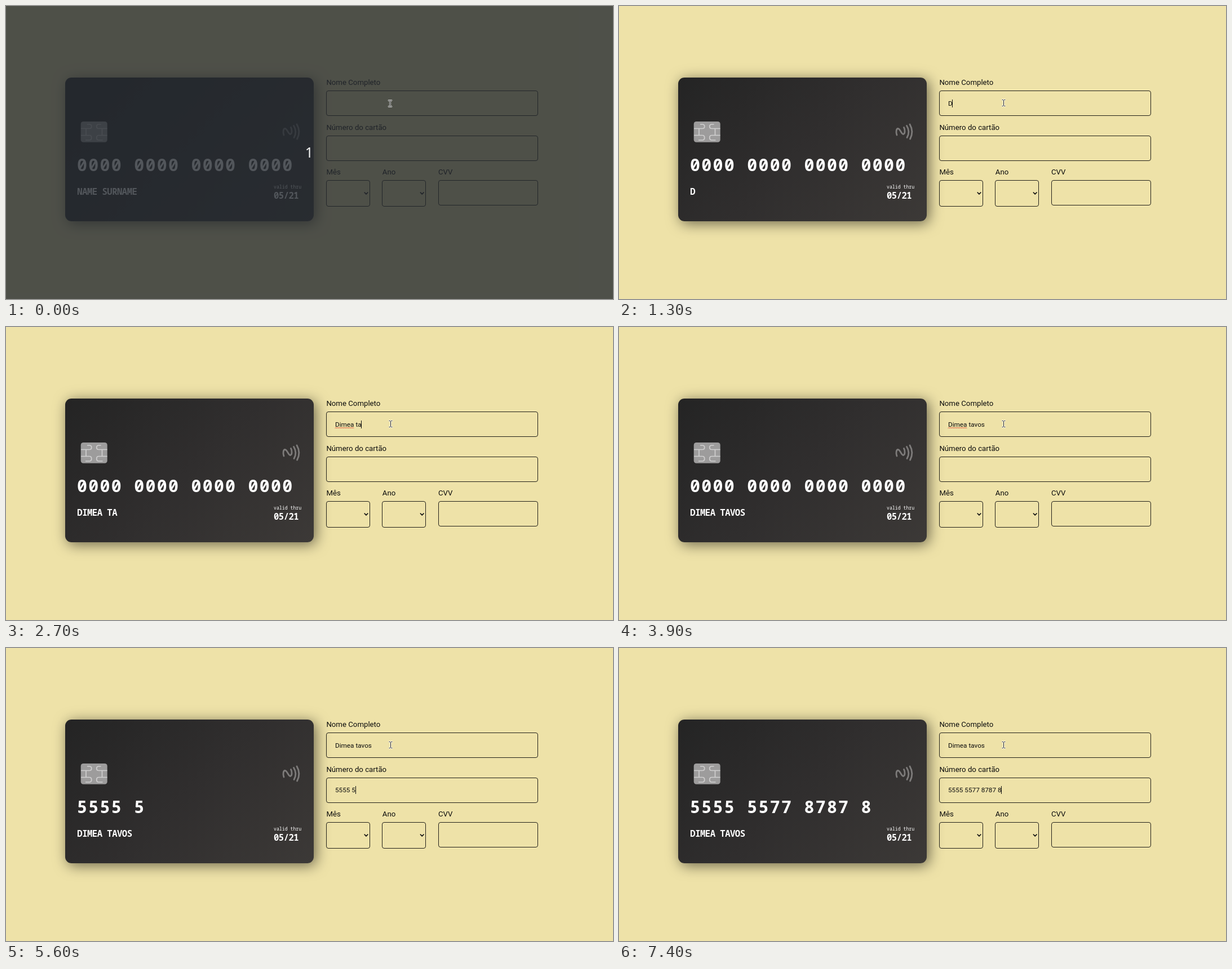
Animation, 1077 px wide and 520 px high, one loop 8000 ms. Source, as an HTML page:

```html
<!DOCTYPE html>
<html lang="pt">
<head>
<meta charset="utf-8">
<title>Card form</title>
<style>
  html, body { margin: 0; width: 100%; height: 100%; overflow: hidden; background: #eee2a8; }
  .card {
    position: absolute; left: 104.5px; top: 127.3px; width: 441.5px; height: 254.5px;
    border-radius: 11px;
    background: linear-gradient(135deg, #242424, #302e2e 50%, #3c3937);
    box-shadow: 4px 4px 24px rgba(0, 0, 0, .55);
  }
  svg { position: absolute; left: 0; top: 0; display: block; }
  text { white-space: pre; }
  .mono { font-family: "Noto Sans Mono", "DejaVu Sans Mono", monospace; fill: #fff; }
  .digits { font-size: 30px; font-weight: 700; letter-spacing: 2.24px; }
  .bold { font-size: 15.6px; font-weight: 700; letter-spacing: -.52px; }
  .small { font-size: 8.2px; }
  .label { font: 13.22px Roboto, sans-serif; fill: #0c0c0c; }
  .value { font: 11.75px Roboto, sans-serif; fill: #0c0c0c; }
  .box { fill: none; stroke: #222019; }
  .line { fill: none; stroke-linecap: round; stroke-linejoin: round; }
  .count { font: 25px "Noto Sans", sans-serif; fill: #f2f2f2; text-anchor: middle; }
</style>
</head>
<body>
<div class="card"></div>
<svg width="1077" height="520" viewBox="0 0 1077 520">
  <defs>
    <path id="contact" d="M133 217.5H148C153 217.5 153 210 148 210H144M142 217.5V229.500M133 229.500H148C153 229.500 153 238 148 238H141"/>
    <path id="beam" d="M-2.500 -5.500H-1L0 -4.500L1 -5.500H2.500M-2.500 5.500H-1L0 4.500L1 5.500H2.500M0 -4.500V4.500"/>
  </defs>

  <rect x="132.700" y="205" width="47" height="36.700" rx="4.500" fill="#9d9c9c"/>
  <g class="line" stroke="#d0cfcf" stroke-width="1.700" style="stroke-linecap:butt">
    <use href="#contact"/>
    <use href="#contact" transform="matrix(-1 0 0 1 312.500 0)"/>
  </g>
  <g class="line" stroke="#7d7b7a" stroke-width="2.800">
    <path d="M493 229C491 224 492 217.500 495 217.500C499 217.500 501 228 504.500 227.500C508 226.500 507.500 219 505.500 215.500"/>
    <path d="M510.500 212.500Q517 223 511 233.500M516 210Q523.500 223 516.500 236"/>
  </g>

  <text id="cardNum" class="mono digits" x="126" y="293"></text>
  <text id="cardName" class="mono bold" x="126.300" y="335.200"></text>
  <text class="mono small" x="475" y="324.300">valid thru</text>
  <text class="mono bold" x="475" y="342">05/21</text>

  <g class="label">
    <text x="568.400" y="139.700">Nome Completo</text>
    <text x="568.400" y="219.500">Número do cartão</text>
    <text x="568.400" y="299">Mês</text>
    <text x="667.800" y="299">Ano</text>
    <text x="767" y="299">CVV</text>
  </g>
  <g class="box">
    <rect x="568.500" y="150.500" width="375" height="44" rx="3.500"/>
    <rect x="568.500" y="230.500" width="375" height="44" rx="3.500"/>
    <rect x="568.500" y="309.500" width="77" height="46" rx="3.500"/>
    <rect x="667.500" y="309.500" width="77" height="46" rx="3.500"/>
    <rect x="767.500" y="309.500" width="176" height="44" rx="3.500"/>
  </g>
  <path class="line" stroke="#111" stroke-width="1.700" style="stroke-linecap:butt"
        d="M635.700 330.500l3.300 3.300l3.300 -3.300M734.900 330.500l3.300 3.300l3.300 -3.300"/>

  <text id="name" class="value" x="584" y="176.900"></text>
  <text id="num" class="value" x="584" y="256.400"></text>
  <path id="wave" class="line" stroke="#e0402c" stroke-width=".9"/>
  <rect id="caret" width="1" height="14" fill="#111"/>

  <g id="shade">
    <rect width="1077" height="520" fill="rgb(36,41,48)" fill-opacity=".79"/>
    <text class="count" x="537.800" y="269">1</text>
  </g>
  <g id="pointer" class="line">
    <use href="#beam" stroke="#fff" stroke-width="2.600" stroke-opacity=".85"/>
    <use href="#beam" stroke="#222" stroke-width="1"/>
  </g>
</svg>
<script>
const LOOP = 8000;
const NAME = 'Dimea tavos';
const NUMBER = '5555 5577 8787 8';

// [time, characters typed]
const nameKeys = [[1300, 1], [1700, 3], [1800, 4], [2000, 5], [2100, 6], [2700, 8], [2900, 9], [3300, 11]];
const numKeys = [[4900, 1], [5200, 3], [5400, 5], [5600, 6], [6300, 8], [6500, 10],
  [6700, 11], [6800, 12], [7200, 15], [7400, 16]];

const el = id => document.getElementById(id);
const typed = (text, keys, t) => text.slice(0, keys.reduce((n, [at, len]) => t >= at ? len : n, 0));
const show = (id, on) => el(id).setAttribute('visibility', on ? 'visible' : 'hidden');
const within = (t, from, to) => t >= from && t < to;

function setText(id, text) {
  if (el(id).textContent !== text) el(id).textContent = text;
}

function wavePath(width) {
  let d = 'M584 179.500';
  for (let x = 1.5, up = true; x <= width; x += 1.5, up = !up) d += `L${584 + x} ${up ? 178.5 : 179.5}`;
  return d;
}

function draw(t) {
  const name = typed(NAME, nameKeys, t);
  const num = typed(NUMBER, numKeys, t);
  setText('name', name);
  setText('num', num);
  setText('cardName', name.toUpperCase() || 'NAME SURNAME');
  setText('cardNum', num || '0000 0000 0000 0000');

  const misspelt = within(t, 2100, 4500);
  show('wave', misspelt);
  if (misspelt) el('wave').setAttribute('d', wavePath(el('name').getSubStringLength(0, 5)));

  const onNumber = t >= 4500;
  const field = el(onNumber ? 'num' : 'name');
  const width = field.textContent ? field.getComputedTextLength() : 0;
  el('caret').setAttribute('x', Math.round(584 + width - .4));
  el('caret').setAttribute('y', onNumber ? 245 : 166);
  show('caret', within(t, 1300, 3900) || within(t, 4500, 4700) || t >= 4900);

  show('shade', t < 400);
  el('pointer').setAttribute('transform', t < 800 ? 'translate(681.5 173)' : 'translate(682.5 172)');
}

const start = performance.now();
function tick() {
  draw((performance.now() - start) % LOOP);
  requestAnimationFrame(tick);
}
draw(0);
requestAnimationFrame(tick);
</script>
</body>
</html>
```
